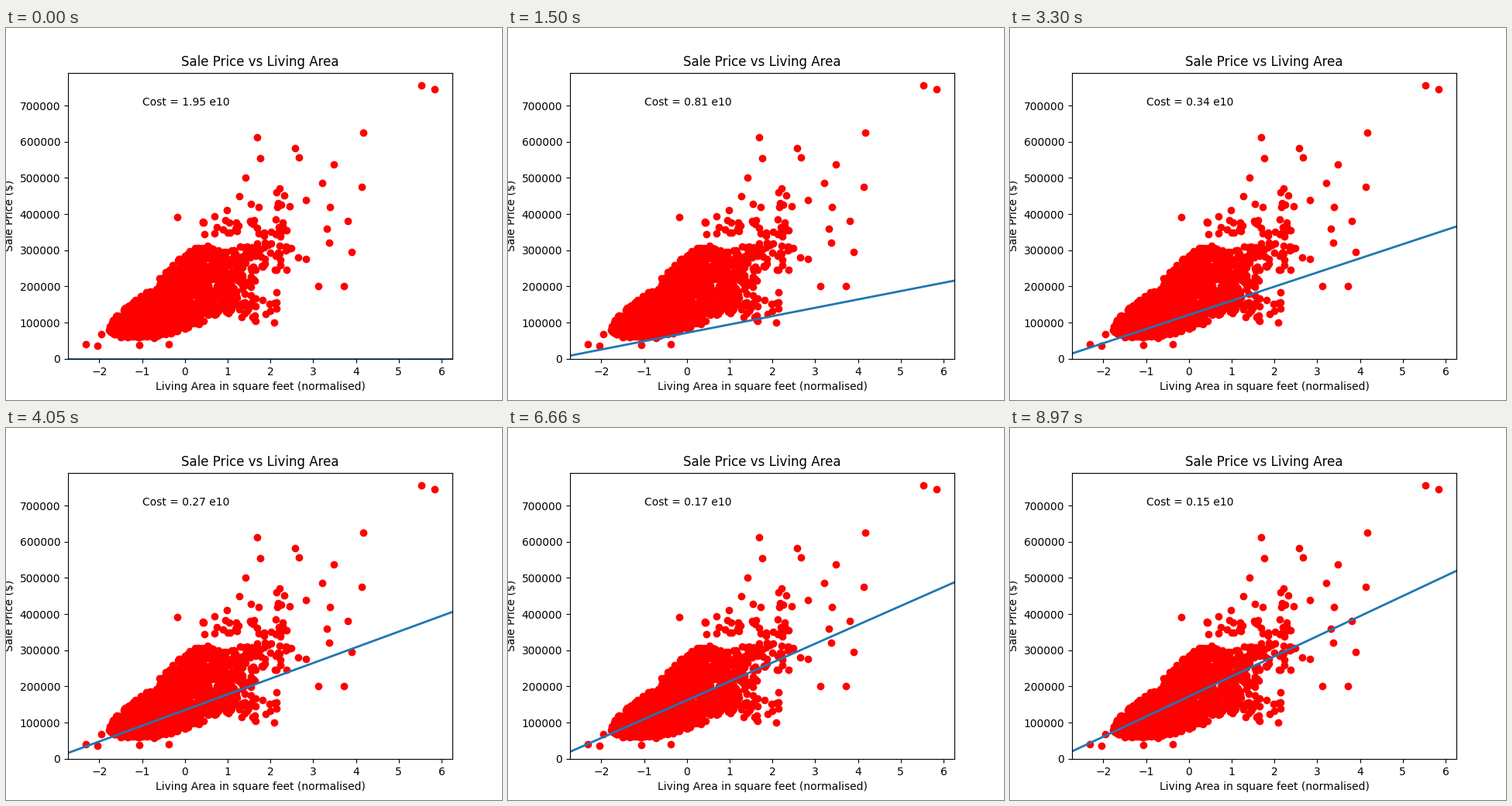
Recreate the animation shown at these times as a matplotlib script. Size 640 by 480 pixels, loop 9000 ms.

```python
import numpy as np
import matplotlib.pyplot as plt
from matplotlib.animation import FuncAnimation

FRAMES, INTERVAL = 300, 30
XLIM, YLIM = (-2.731, 6.2545), (-1105, 791005)
DECAY = 0.99                       # error kept after each descent step
INTERCEPT, SLOPE = 180930, 58450   # fitted line
COST_START, COST_END = 1.953, 0.1455

# The most remote houses: normalised area, price in thousands
REMOTE = [
    (5.53, 756), (5.84, 745), (4.17, 625), (1.69, 612), (1.765, 555),
    (2.58, 583), (2.67, 557), (3.48, 538), (3.21, 485), (4.13, 475),
    (1.42, 501), (2.83, 439), (3.4, 420), (3.81, 381), (3.32, 360),
    (3.37, 320), (3.9, 295), (3.12, 200), (3.715, 201), (-0.175, 392),
    (-2.31, 41), (-2.04, 36), (-1.95, 68), (-1.06, 38), (-0.375, 40),
]


def make_houses(rng):
    # Dense body between two price limits that rise with area
    x = -1.8 + 4 * rng.beta(1.7, 2.8, 1280)
    low = np.interp(x, [-1.8, -1.5, -0.7, 0.6, 1.0, 1.95],
                    [78, 57, 57, 102, 140, 250])
    high = np.interp(x, [-1.8, -1.5, -0.75, -0.5, 0.35, 1.0, 1.95],
                     [92, 133, 200, 240, 328, 300, 345])
    body = np.column_stack([x, low + (high - low) * rng.beta(1.3, 1.5, x.size)])

    def patch(count, corner, opposite):
        return rng.uniform(corner, opposite, (count, 2))

    return np.vstack([
        body, REMOTE,
        patch(18, (0.35, 335), (1.25, 400)),
        patch(11, (0.9, 400), (2.6, 470)),
        patch(30, (1.5, 290), (2.4, 385)),
        patch(13, (2.1, 235), (2.9, 310)),
        patch(24, (0.9, 120), (1.5, 180)),
        patch(22, (1.2, 95), (2.2, 205)),
    ])


houses = make_houses(np.random.default_rng(7))

fig, ax = plt.subplots(figsize=(6.4, 4.8), dpi=100)
ax.scatter(houses[:, 0], houses[:, 1] * 1000, color="red")
ax.set(xlim=XLIM, ylim=YLIM, title="Sale Price vs Living Area",
       xlabel="Living Area in square feet (normalised)",
       ylabel="Sale Price ($)")
xs = np.array(XLIM)
line, = ax.plot(xs, 0 * xs, lw=2, color="C0")
label = ax.text(-1, 700000, "")


def update(step):
    error = DECAY ** step
    line.set_ydata((1 - error) * (INTERCEPT + SLOPE * xs))
    cost = COST_END + (COST_START - COST_END) * error ** 2
    label.set_text(f"Cost = {cost:.2f} e10")
    return line, label


anim = FuncAnimation(fig, update, frames=FRAMES, interval=INTERVAL,
                     repeat=True, repeat_delay=0)
plt.show()
```
